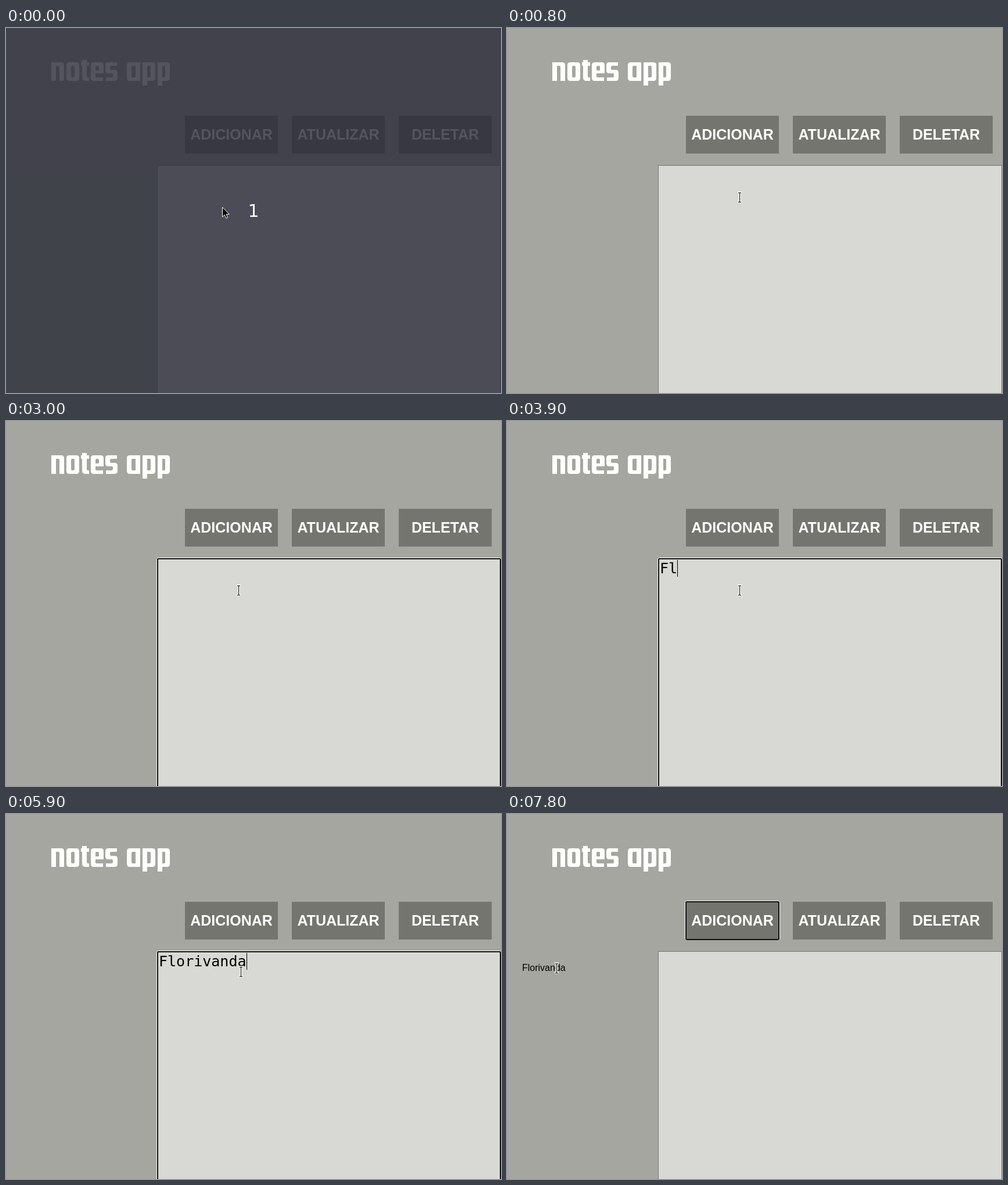
An HTML page that plays this animation: 852 by 628 pixels, repeating every 8000 ms.

```html
<!DOCTYPE html>
<html lang="pt">
<head>
<meta charset="utf-8">
<title>notes app</title>
<style>
  html, body { margin: 0; width: 100%; height: 100%; overflow: hidden; background: #a5a6a0; }
  svg { display: block; width: 852px; height: 628px; }
  .button { fill: #74756f; }
  .label { font: bold 25px "Liberation Sans", Arial, sans-serif; fill: #fffffb; text-anchor: middle; }
  .typed { font: 25px "DejaVu Sans Mono", monospace; }
  .item { font: 16px "Liberation Sans", Arial, sans-serif; }
  .count { font: 30px "DejaVu Sans", sans-serif; fill: #fff; text-anchor: middle; }
  .ring { fill: none; }
  .halo { stroke: #fff; }
  .line { stroke: #101010; stroke-width: 2; }
  .pointer { fill: #000; stroke: #fff; stroke-linejoin: round; }
  .beam { fill: none; stroke-linecap: square; }
</style>
</head>
<body>
<svg viewBox="0 0 852 628">
  <rect width="852" height="628" fill="#a5a6a0"/>
  <path aria-label="notes app" fill="#fffffb" fill-rule="evenodd" d="
    M78 59H95Q100 59 100 64V91H92V67Q92 65 90 65H86V91H78Z
    M109 59H121Q126 59 126 64V86Q126 91 121 91H109Q104 91 104 86V64Q104 59 109 59Z
    M114 65Q112 65 112 67V83Q112 85 114 85H116Q118 85 118 83V67Q118 65 116 65Z
    M131 55H139V59H143V65H139V83Q139 85 141 85H143V91H137Q131 91 131 85V65H129V59H131Z
    M151 59H163Q168 59 168 64V78H154V83Q154 85 156 85H167V91H151Q146 91 146 86V64Q146 59 151 59Z
    M156 65Q154 65 154 67V73H160V67Q160 65 158 65Z
    M176 59H191V65H181Q179 65 179 67V70Q179 72 181 72H187Q192 72 192 77V86Q192 91 187 91H172V85H182Q184 85 184 83V80Q184 78 182 78H176Q171 78 171 73V64Q171 59 176 59Z
    M213 59H231V91H213Q208 91 208 86V64Q208 59 213 59Z
    M218 65Q216 65 216 67V83Q216 85 218 85H223V65Z
    M235 59H252Q257 59 257 64V86Q257 91 252 91H243V99H235Z
    M243 65V85H247Q249 85 249 83V67Q249 65 247 65Z
    M261 59H277Q282 59 282 64V86Q282 91 277 91H269V99H261Z
    M269 65V85H272Q274 85 274 83V67Q274 65 272 65Z"/>

  <rect class="button" x="308" y="151" width="160" height="65"/>
  <rect class="button" x="492" y="151" width="160" height="65"/>
  <rect class="button" x="676" y="151" width="160" height="65"/>
  <text class="label" x="388" y="192">ADICIONAR</text>
  <text class="label" x="572" y="192">ATUALIZAR</text>
  <text class="label" x="756" y="192">DELETAR</text>
  <g id="buttonFocus" class="ring">
    <rect class="halo" x="306.5" y="149.5" width="163" height="67" rx="3"/>
    <rect class="line" x="308" y="151" width="160" height="65" rx="2"/>
  </g>

  <rect x="260.5" y="236.5" width="591" height="400" fill="#d8d9d4" stroke="#767676"/>
  <g id="fieldFocus" class="ring">
    <rect class="halo" x="259.5" y="235.5" width="593" height="400" rx="3"/>
    <rect class="line" x="261" y="237" width="590" height="400" rx="2"/>
  </g>
  <text id="typed" class="typed" x="263" y="262"></text>
  <rect id="caret" y="239" width="1" height="29"/>
  <text id="item" class="item" x="26" y="270"></text>

  <g id="overlay">
    <rect width="852" height="628" fill="#282a36" fill-opacity=".8"/>
    <text class="count" x="426" y="325">1</text>
  </g>

  <g id="cursor">
    <path id="arrow" class="pointer" d="M.5 .5V17L4.3 13.4L7 19.3L9.7 18.1L7.1 12.3H12.3Z"/>
    <g id="beam" class="beam">
      <path stroke="#fff" stroke-width="3" d="M-1.5-8H2.5M.5-8V8M-1.5 8H2.5"/>
      <path stroke="#000" d="M-1.5-7.5H2.5M.5-7.5V8.5M-1.5 8.5H2.5"/>
    </g>
    <path id="hand" class="pointer" d="M-2.5-6.5Q-1-8 .5-6.5V-2.5L5.5-1Q7-.5 7 1.5V4L5.5 7.5H-1.5V5.5L-5.5 1.5Q-6-.5-4-.5L-2.5 .5Z"/>
  </g>
</svg>
<script>
const $ = id => document.getElementById(id);
const show = (id, on) => $(id).style.display = on ? '' : 'none';

const LOOP = 8000, BLINK = 600, CHAR = 15.05;
const FOCUS = 1200, PRESS = 6400, ADDED = 6600;
const name = 'Florivanda';
const keys = [3400, 3900, 4100, 4200, 4400, 4500, 4700, 5000, 5300, 5400];
// time, shape, x, y
const moves = [
  [0, 'arrow', 372, 308],
  [100, 'beam', 373, 310],
  [700, 'beam', 391, 297],
  [800, 'beam', 400, 291],
  [5900, 'beam', 404, 271],
  [6000, 'beam', 409, 246],
  [6100, 'hand', 418, 199],
  [6200, 'hand', 417, 192],
  [7200, 'arrow', 270, 212],
  [7300, 'arrow', 145, 290],
  [7500, 'arrow', 122, 286],
  [7600, 'arrow', 105, 282],
  [7800, 'beam', 85, 265]
];

function draw(t) {
  const count = keys.filter(k => k <= t).length;
  const focused = t >= FOCUS && t < PRESS;
  const lastKey = count ? keys[count - 1] : FOCUS;

  show('overlay', t < 100);
  show('fieldFocus', focused);
  show('buttonFocus', t >= PRESS);
  show('caret', focused && Math.floor((t - lastKey) / BLINK) % 2 === 0);
  $('caret').setAttribute('x', Math.round(263 + count * CHAR));
  $('typed').textContent = t < ADDED ? name.slice(0, count) : '';
  $('item').textContent = t < ADDED ? '' : name;

  const [, shape, x, y] = moves.filter(m => m[0] <= t).pop();
  for (const id of ['arrow', 'beam', 'hand']) show(id, id === shape);
  $('cursor').setAttribute('transform', `translate(${x} ${y})`);
}

function tick() {
  draw(performance.now() % LOOP);
  requestAnimationFrame(tick);
}
tick();
</script>
</body>
</html>
```
